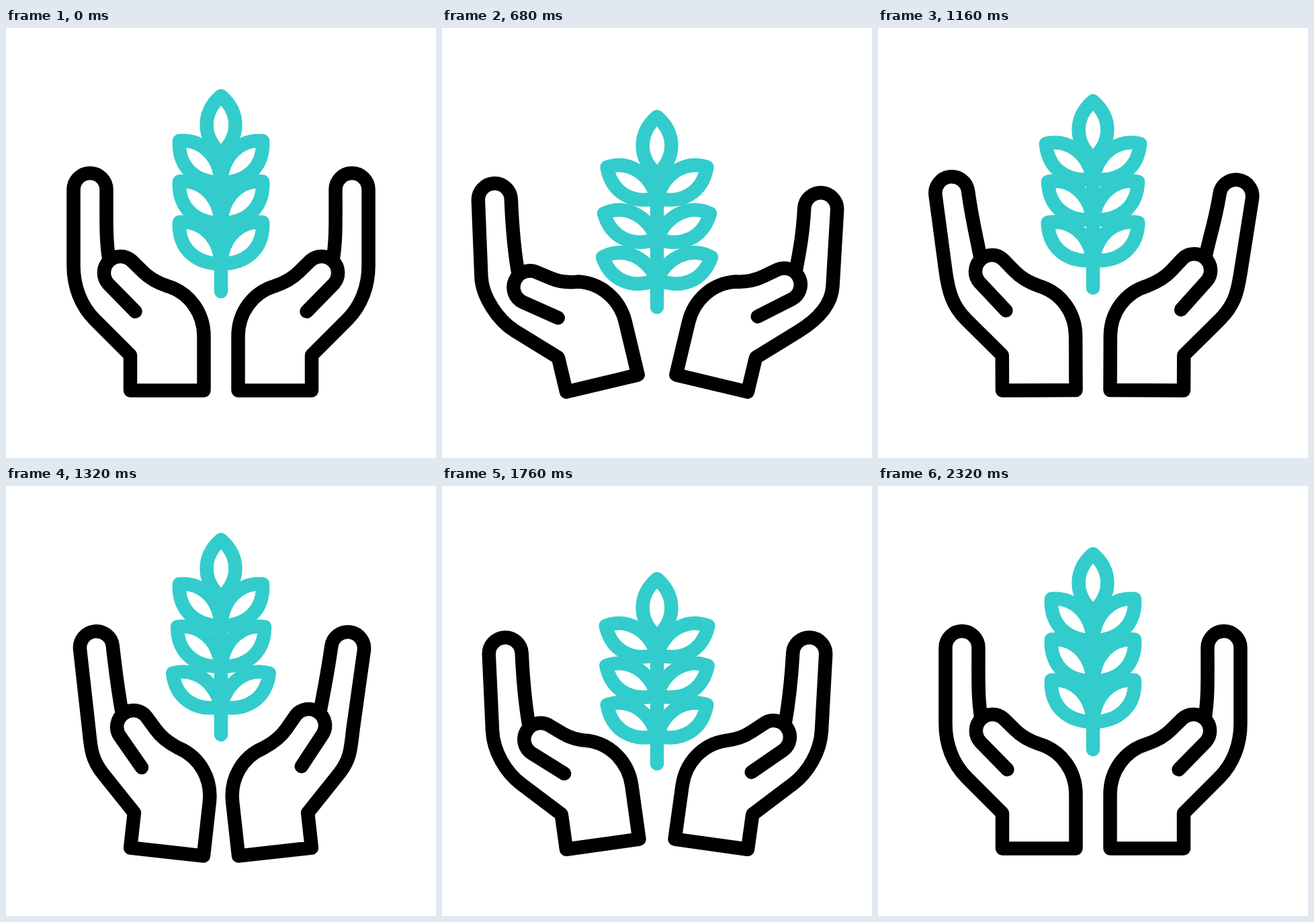
An HTML page for the animation above (2400 ms loop, 640 by 640 pixels).

```html
<!DOCTYPE html>
<html lang="en">
<head>
<meta charset="utf-8">
<title>Hands and wheat</title>
<style>
  html, body { margin: 0; width: 100%; height: 100%; overflow: hidden; background: #fff; }
  svg { display: block; width: 100%; height: 100%; }
  path { fill: none; stroke-width: 20.5; stroke-linecap: round; stroke-linejoin: round; }
  .hand { stroke: #000; }
  #wheat path { stroke: #33cccc; }
</style>
</head>
<body>
<svg viewBox="0 0 640 640">
  <path class="hand"/>
  <path class="hand" transform="matrix(-1 0 0 1 640 0)"/>
  <g id="wheat">
    <path id="stem"/>
    <path id="top" d="M320 101C291.5 126 291.5 162 320 187C348.5 162 348.5 126 320 101Z"/>
  </g>
</svg>
<script>
const LOOP = 2400, START = 220, END = 2320;
const BEATS = [680, 1000, 1320, 1600, 1940];

// Smooth curve through keys; flat at turning points and at rest on both ends.
function track(times, values) {
  const t = [START, ...times, END], v = [0, ...values, 0];
  const slope = i => (v[i + 1] - v[i]) / (t[i + 1] - t[i]);
  const tangent = i => {
    if (i === 0 || i === t.length - 1) return 0;
    const a = slope(i - 1), b = slope(i);
    return a * b > 0 ? (a + b) / 2 : 0;
  };
  return now => {
    if (now <= START || now >= END) return 0;
    const i = t.findIndex(x => x > now) - 1;
    const d = t[i + 1] - t[i], p = (now - t[i]) / d, q = 1 - p;
    return q * q * (1 + 2 * p) * v[i] + p * p * (1 + 2 * q) * v[i + 1]
      + d * p * q * (q * tangent(i) - p * tangent(i + 1));
  };
}

// Rotate around `from`, then carry that pivot to `to`.
function placer(from, to, deg) {
  const a = deg * Math.PI / 180, c = Math.cos(a), s = Math.sin(a);
  return (x, y) => {
    const dx = x - from[0], dy = y - from[1];
    return [to[0] + c * dx - s * dy, to[1] + s * dx + c * dy];
  };
}

const PIVOT = [194, 540], TIP = [125, 240.5], THUMB = [169.5, 363.5];
const wristTurn = track([810, 1375, 1800], [-15.3, 6.9, -8.3]);

const hands = [
  { fx: [21, 2, -24, 9.8, 9], fy: [-9, 2, 6, -1.5, -3], ty: [11.4, 2.4, -4.4, 8.3, 6.8] },
  { fx: [19, 0, -27, 5.8, 7], fy: [5, 10.5, 7, -1.5, -3], ty: [7.4, 0.4, -6.4, 4.3, 3.8] }
].map((h, i) => ({
  el: document.querySelectorAll('.hand')[i],
  fingerX: track(BEATS, h.fx),
  fingerY: track(BEATS, h.fy),
  thumbY: track(BEATS, h.ty)
}));

function handPath(hand, now) {
  const turn = wristTurn(now), fx = hand.fingerX(now), ty = hand.thumbY(now);
  const W = placer(PIVOT, PIVOT, turn);
  const [ax, ay] = W(...TIP), [bx, by] = W(...THUMB);
  const F = placer(TIP, [ax + fx, ay + hand.fingerY(now)], turn + 0.53 * fx);
  const T = placer(THUMB, [bx + 0.5 * ty / 10, by + ty], turn - 0.72 * ty);
  const [cx, cy] = T(...THUMB);
  const arc = 'A24.5 24.5 0 0 1';
  return [
    'M', T(192.5, 422), 'L', T(152.2, 380.8), arc, T(186.8, 346.2), 'L', T(204, 363),
    'C', T(213, 372), T(225, 379), W(240, 384),
    'C', W(273, 394), W(294.5, 424), W(294.5, 459),
    'L', W(294.5, 539.5), W(185, 539.5), W(185, 487), W(132, 434),
    'C', W(111, 413), F(100.5, 384), F(100.5, 354),
    'L', F(100.5, 240.5), arc, F(149.5, 240.5),
    'C', F(149.5, 285), [cx - 21, cy - 46.5], [cx - 16, cy - 18.5]
  ].join(' ');
}

const wheat = document.getElementById('wheat');
const stem = document.getElementById('stem'), topLeaf = document.getElementById('top');
const stemShift = track([680, 780, 1000, 1320, 1350, 1600, 1820, 1940],
  [23.5, 27, 13, -22, -23, 1.5, 24, 19]);
const topShift = track([680, 850, 1000, 1320, 1370, 1600, 1850, 1940],
  [31, 44, 35, -21, -26, 10, 44, 38]);

const rows = [
  [-13, -16.4, 0, -16.4, -12.5],
  [-19.3, -9, -2.8, -20.8, -4.8],
  [-22.5, -2.8, -10, -20.8, -1]
].map((angles, i) => ({
  y: 229 + 60.5 * i,
  turn: track(BEATS, angles),
  leaves: [1, -1].map(side => {
    const el = document.createElementNS('http://www.w3.org/2000/svg', 'path');
    el.setAttribute('d', 'M-62-62C-28-65-2-39 0 0C-39 0-64-24-62-62Z');
    wheat.append(el);
    return { el, side };
  })
}));

function draw() {
  const now = performance.now() % LOOP;
  for (const hand of hands) hand.el.setAttribute('d', handPath(hand, now));
  const base = stemShift(now), top = topShift(now);
  stem.setAttribute('d', `M320 ${187 + top}V${392 + base}`);
  topLeaf.setAttribute('transform', `translate(0 ${top})`);
  for (const row of rows)
    for (const { el, side } of row.leaves)
      el.setAttribute('transform',
        `translate(320 ${row.y + base + 1}) scale(${side} 1) rotate(${row.turn(now)})`);
  requestAnimationFrame(draw);
}
draw();
</script>
</body>
</html>
```
